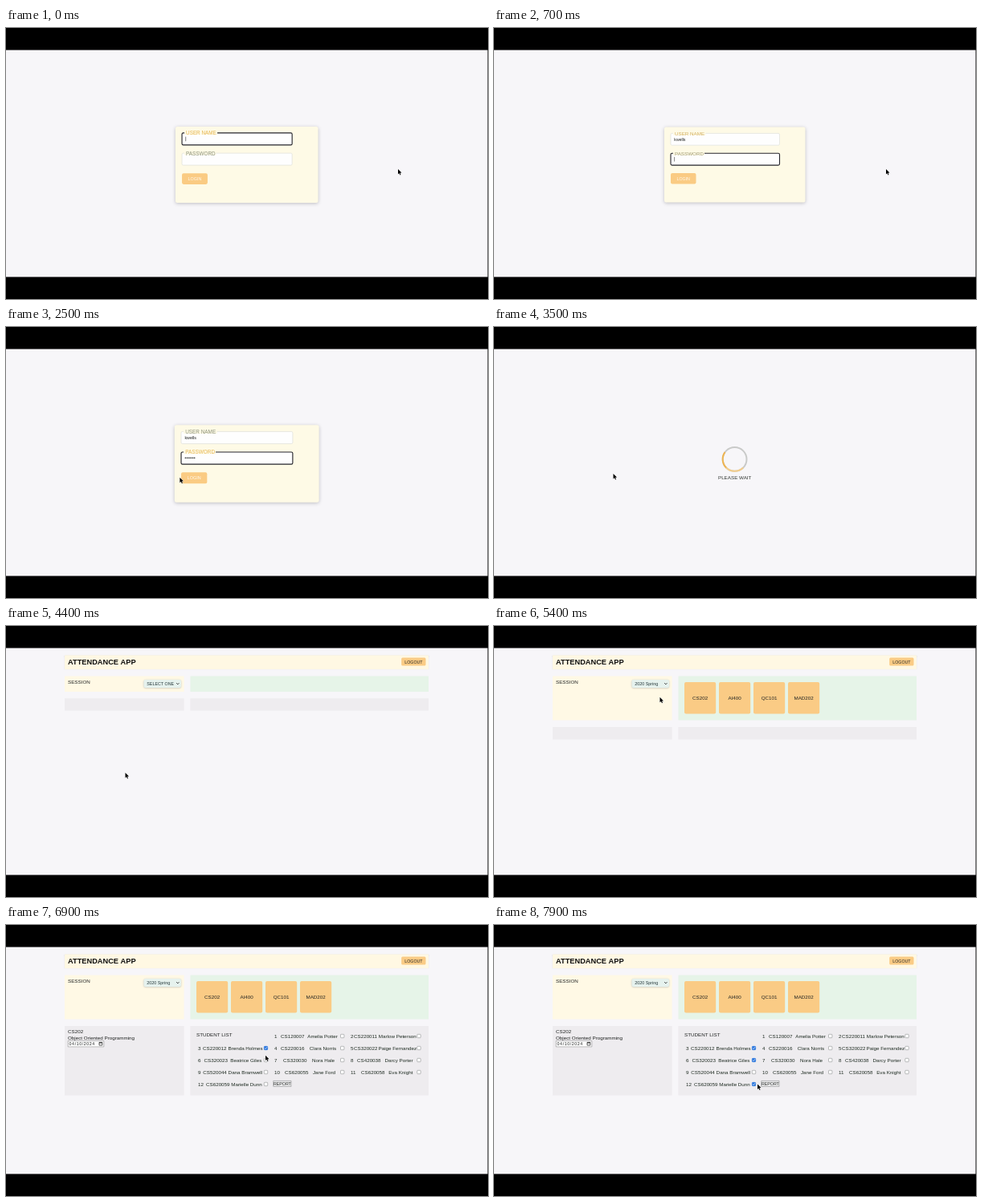
An HTML page with a canvas for the animation above (8000 ms loop, 600 px wide and 338 px high).

```html
<!DOCTYPE html>
<html lang="en">
<head>
<meta charset="utf-8">
<title>Attendance app</title>
<style>
  html, body { margin: 0; width: 100%; height: 100%; overflow: hidden; background: #000; }
  canvas { display: block; width: 600px; height: 338px; }
</style>
</head>
<body>
<canvas id="stage" width="600" height="338"></canvas>
<script>
const ctx = document.getElementById('stage').getContext('2d');
const LOOP = 8000;
const SANS = '"Liberation Sans", Arial, sans-serif';
const PAGE = '#f7f6f9', CREAM = '#fefae6', AMBER = '#facb85', GREEN = '#e6f4e8', GREY = '#eeecef';

// Moments at which the interface changes state
const AT = {
  typeUser: 100, focusPass: 640, typePass: 800, hoverLogin: 1640, leaveLogin: 2480,
  wait: 2850, waitEnd: 3900, app: 4100, open: 4930, pick: 5220, hoverCourse: 5560,
  list: 5720, leaveCourse: 6500
};
const CHECKS = { 3: 6780, 6: 7020, 12: 7440 };
const USER = 'kwells';

// time, x, y
const POINTER = [
  [0, 488, 176], [1250, 488, 176], [1450, 430, 78], [1600, 330, 100], [1800, 233, 187],
  [2000, 240, 198], [2200, 236, 188], [2400, 234, 188], [2700, 166, 187], [2900, 148.5, 183],
  [4550, 148.5, 183], [4880, 206, 72], [4980, 206, 72], [5180, 194, 88], [5300, 194, 88],
  [5650, 257, 92], [6420, 257, 92], [6700, 323, 153], [6810, 323, 153], [6960, 323, 168],
  [7060, 323, 168], [7360, 323, 197], [7480, 323, 198], [7650, 328, 198.5]
];

// number, id, id x, name, name centre, row; column follows from the number
const STUDENTS = [
  [1, 'CS120007', 342, 'Amelia Potter', 394, 0], [2, 'CS220011', 433, 'Marlow Peterson', 487.3, 0],
  [3, 'CS220012', 245, 'Brenda Holmes', 298, 1], [4, 'CS220016', 342, 'Clara Norris', 394.5, 1],
  [5, 'CS320022', 433, 'Paige Fernandez', 487.3, 1], [6, 'CS320023', 246.5, 'Beatrice Giles', 298.8, 2],
  [7, 'CS320030', 345, 'Nora Hale', 395, 2], [8, 'CS420038', 437, 'Darcy Porter', 489, 2],
  [9, 'CS520044', 245.3, 'Dana Bramwell', 297.8, 3], [10, 'CS620055', 347, 'Jane Ford', 396, 3],
  [11, 'CS620058', 442, 'Eva Knight', 491.3, 3], [12, 'CS620059', 249, 'Marielle Dunn', 299.5, 4]
];
const COURSES = ['CS202', 'AI400', 'QC101', 'MAD202'];

const clamp = v => Math.max(0, Math.min(1, v));
const ease = v => { v = clamp(v); return v * v * (3 - 2 * v); };
const ramp = (t, start, len) => ease((t - start) / len);
const lerp = (a, b, k) => a + (b - a) * k;
const blend = (a, b, k) => `rgb(${a.map((v, i) => Math.round(lerp(v, b[i], k)))})`;

function pointerAt(t) {
  for (let i = 1; i < POINTER.length; i++) {
    const [t0, x0, y0] = POINTER[i - 1], [t1, x1, y1] = POINTER[i];
    if (t < t1) {
      const k = ease((t - t0) / (t1 - t0));
      return [lerp(x0, x1, k), lerp(y0, y1, k)];
    }
  }
  return POINTER[POINTER.length - 1].slice(1);
}

function box(x, y, w, h, fill, { r = 0, line, lw = 0.5, shadow = 0 } = {}) {
  ctx.save();
  ctx.beginPath();
  ctx.roundRect(x, y, w, h, r);
  if (shadow) {
    ctx.shadowColor = 'rgba(60,60,70,.3)';
    ctx.shadowBlur = shadow;
    ctx.shadowOffsetY = shadow / 4;
  }
  ctx.fillStyle = fill;
  ctx.fill();
  ctx.restore();
  if (line) {
    ctx.strokeStyle = line;
    ctx.lineWidth = lw;
    ctx.stroke();
  }
}

function text(str, x, y, { size = 6.25, color = '#202322', align = 'left', weight = '' } = {}) {
  ctx.font = `${weight} ${size}px ${SANS}`;
  ctx.fillStyle = color;
  ctx.textAlign = align;
  ctx.textBaseline = 'alphabetic';
  ctx.fillText(str, x, y + size * 0.36);
}

function stroke(color, lw, ...pts) {
  ctx.beginPath();
  pts.forEach(([x, y]) => ctx.lineTo(x, y));
  ctx.strokeStyle = color;
  ctx.lineWidth = lw;
  ctx.stroke();
}

function scaled(cx, cy, s, draw) {
  ctx.save();
  ctx.translate(cx, cy);
  ctx.scale(s, s);
  ctx.translate(-cx, -cy);
  draw();
  ctx.restore();
}

function field(y, label, focus, gold, labelWidth) {
  box(220, y, 135.5, 14.8, '#fefefe',
    focus ? { r: 1.6, line: '#24242c', lw: 1.1 } : { r: 1.6, line: '#d9dcd8', lw: 0.6 });
  box(223, y - 3, labelWidth, 5.4, CREAM);
  text(label, 225, y + 0.2, { color: blend([139, 146, 124], [230, 182, 84], gold) });
}

function login(t) {
  const grow = t < 1000
    ? 0.012 * (1 - ramp(t, 0, 350))
    : 0.025 * (ramp(t, AT.hoverLogin, 330) - ramp(t, AT.leaveLogin, 350));
  const typed = USER.slice(0, Math.max(0, Math.floor((t - AT.typeUser) / 80)));
  const dots = Math.max(0, Math.min(7, Math.floor((t - AT.typePass) / 80)));
  const inPass = t >= AT.focusPass;
  const shift = ramp(t, AT.focusPass - 60, 400);

  scaled(299.7, 170.5, 1 + grow, () => {
    box(212, 123.5, 175.5, 94, CREAM, { r: 2.5, shadow: 4 });
    field(131.4, 'USER NAME', !inPass, 1 - shift, 40.5);
    field(156.3, 'PASSWORD', inPass, shift, 39);
    text(typed, 224.3, 138.7, { size: 5.2 });
    ctx.fillStyle = '#202322';
    for (let i = 0; i < dots; i++) {
      ctx.beginPath();
      ctx.arc(225.2 + i * 1.85, 163.4, 0.75, 0, 7);
      ctx.fill();
    }
    if (t < 1500) {
      ctx.font = `5.2px ${SANS}`;
      const x = inPass ? 224.6 + dots * 1.85 : 224.6 + ctx.measureText(typed).width;
      const y = inPass ? 163.7 : 138.8;
      stroke('#333', 0.6, [x, y - 2.8], [x, y + 2.8]);
    }
    box(220, 181, 31.5, 13.6, '#facb83', { r: 2 });
    text('LOGIN', 235.7, 187.8, { size: 5.3, color: '#fffaf0', align: 'center' });
  });
}

function wait(t) {
  const turn = (t - 3500) / 1000 * Math.PI * 2;
  const arc = (from, to, color) => {
    ctx.beginPath();
    ctx.arc(299.6, 164.9, 14.9, turn + from * Math.PI, turn + to * Math.PI);
    ctx.strokeStyle = color;
    ctx.lineWidth = 2;
    ctx.stroke();
  };
  arc(0, 2, '#c9cac9');
  arc(0.25, 0.76, '#f3cd8b');
  arc(0.75, 1.2, '#efb552');
  text('PLEASE WAIT', 299.7, 187.9, { align: 'center', color: '#353a36' });
}

function session(t) {
  const label = t < AT.pick ? 'SELECT ONE' : '2020 Spring';
  text('SESSION', 77, 70);
  box(171.5, 67, 46.5, 10, '#e6f2ee', { r: 2, shadow: 2 });
  text(label, 175.3, 72, { size: 5.35, color: '#25383a' });
  stroke('#222', 0.9, [212.2, 71.2], [213.8, 72.8], [215.4, 71.2]);
}

function popup(t) {
  if (t < AT.open || t >= AT.pick) return;
  const row = t < 5090 ? 0 : 1;
  box(171.5, 77.5, 46.5, 15, '#fff', { line: '#8a8d8c' });
  box(171.8, 78 + row * 7, 45.9, 7, '#2f6fd6');
  ['SELECT ONE', '2020 Spring'].forEach((s, i) =>
    text(s, 175.3, 81.5 + i * 7, { size: 5.35, color: i === row ? '#fff' : '#25383a' }));
}

function courses(t) {
  const hover = ramp(t, AT.hoverCourse, 250) - ramp(t, AT.leaveCourse, 250);
  COURSES.forEach((name, i) => {
    const x = 237 + i * 43;
    scaled(x + 19.6, 89.7, i ? 1 : 1 + 0.1 * hover, () => {
      box(x, 70, 39.2, 39.4, AMBER, { r: 2 });
      text(name, x + 19.6, 89.8, { align: 'center' });
    });
  });
}

function details() {
  text('CS202', 77, 133.1);
  text('Object Oriented Programming', 77, 140.6);
  box(77.2, 144.5, 44.6, 7.4, '#fff', { line: '#7b7b7d' });
  ctx.letterSpacing = '0.6px';
  text('04/10/2024', 78.6, 148.2, { size: 5.25 });
  ctx.letterSpacing = '0px';
  box(116, 146.4, 3.8, 3.6, '#fff', { line: '#222', lw: 0.7 });
  stroke('#222', 1, [115.9, 146.9], [119.9, 146.9]);
}

function students(t) {
  text('STUDENT LIST', 237, 136.7);
  for (const [no, id, idX, name, mid, row] of STUDENTS) {
    const col = no % 3, y = 138.7 + row * 15;
    const left = [239, 334, 429][col], tick = [323.5, 418.7, 514][col];
    const ink = { color: '#1d2a20' };
    text(String(no), left, y, ink);
    text(id, idX, y, ink);
    text(name, mid, y, { ...ink, align: 'center' });
    const on = t >= CHECKS[no];
    box(tick - 2.2, y - 2.4, 4.4, 4.4, on ? '#2070dc' : '#fff',
      { r: 0.8, line: on ? '#2070dc' : '#777a7a' });
    if (on) stroke('#fff', 0.8, [tick - 1.3, y - 0.2], [tick - 0.4, y + 0.8], [tick + 1.4, y - 1.4]);
  }
  box(332.8, 194.4, 22.2, 7, '#efeff0', { line: '#77797a' });
  text('REPORT', 343.9, 197.9, { size: 5.25, align: 'center' });
}

function app(t) {
  const picked = t >= AT.pick, listed = t >= AT.list;
  const topH = picked ? 55 : 19.5;
  const lowY = picked ? 126 : 90.2, lowH = listed ? 86.6 : 15.4;

  box(73, 36.5, 453, 17.5, '#fff8e3', { shadow: 1.5 });
  text('ATTENDANCE APP', 77, 44.7, { size: 9.25, weight: 'bold', color: '#111' });
  box(492.2, 39.6, 30.3, 10, AMBER, { r: 1.5 });
  text('LOGOUT', 507.4, 44.6, { size: 5.3, align: 'center' });

  box(73, 62.5, 148.6, topH, '#fff9e5');
  box(229.4, 62.5, 296.6, topH, GREEN);
  box(73, lowY, 148.6, lowH, GREY);
  box(229.4, lowY, 296.6, lowH, GREY);
  session(t);
  if (picked) courses(t);
  if (listed) {
    details();
    students(t);
  }
  popup(t);
}

function pointer(t) {
  const [x, y] = pointerAt(t);
  const overLabel = t > 5600 && Math.hypot(x - 257, y - 90) < 8;
  if (overLabel) {
    stroke('#222', 0.8, [x, y - 3.2], [x, y + 3.2]);
    stroke('#222', 0.7, [x - 1.3, y - 3.4], [x + 1.3, y - 3.4]);
    stroke('#222', 0.7, [x - 1.3, y + 3.4], [x + 1.3, y + 3.4]);
    return;
  }
  const shape = [[0, 0], [0, 6.4], [1.5, 5.1], [2.5, 7.4], [3.5, 7], [2.5, 4.7], [4.5, 4.6]];
  ctx.beginPath();
  shape.forEach(([dx, dy]) => ctx.lineTo(x + dx, y + dy));
  ctx.closePath();
  ctx.strokeStyle = '#fff';
  ctx.lineWidth = 0.7;
  ctx.stroke();
  ctx.fillStyle = '#000';
  ctx.fill();
}

function draw(t) {
  box(0, 0, 600, 338, '#000');
  box(0, 27.5, 599.5, 283, PAGE);
  if (t >= AT.app) app(t);
  else if (t >= AT.wait && t < AT.waitEnd) wait(t);
  else login(t);
  pointer(t);
}

let start;
function tick(now) {
  start ??= now;
  draw((now - start) % LOOP);
  requestAnimationFrame(tick);
}
draw(0);
requestAnimationFrame(tick);
</script>
</body>
</html>
```
